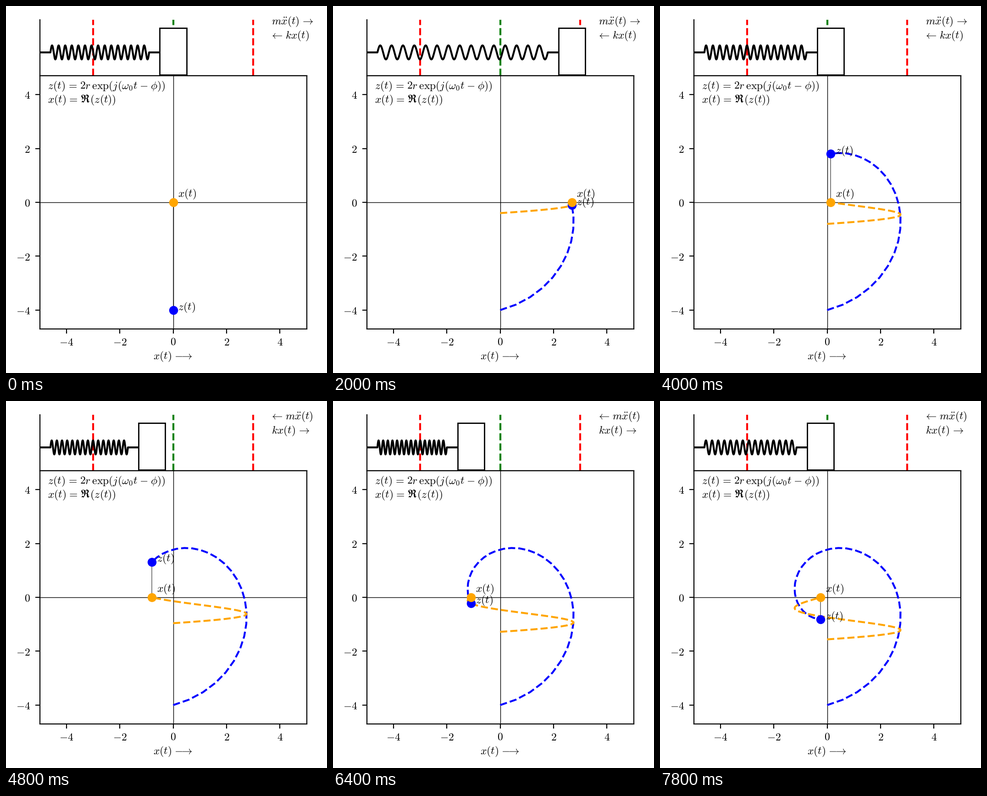
Animation of 700 by 800 pixels, one loop 8000 ms. Source, as a matplotlib script:

```python
import numpy as np
import matplotlib.pyplot as plt
from matplotlib.animation import FuncAnimation
from matplotlib.patches import Rectangle

plt.rcParams.update({
    "mathtext.fontset": "cm",
    "text.hinting": "no_hinting",
    "font.size": 8.48,
    "axes.linewidth": 0.8,
    "xtick.major.pad": 2.8,
    "ytick.major.pad": 3.9,
})

W, H, DPI = 700, 800, 200
FRAMES, INTERVAL = 40, 200
DT = 0.04          # time step per frame
DECAY = 0.994
OMEGA = 3.838
COILS = 15
LABEL_DX = 0.18

steps = np.arange(FRAMES) * DT
amp = 4 * np.exp(-DECAY * steps)
zx = amp * np.sin(OMEGA * steps)
zy = -amp * np.cos(OMEGA * steps)

fig = plt.figure(figsize=(W / DPI, H / DPI), dpi=DPI, facecolor="white")


def add_axes(top, height, left=73.55, width=582):
    return fig.add_axes([left / W, 1 - (top + height) / H, width / W, height / H])


# Spring and mass
top = add_axes(30, 122)
top.set(xlim=(-5, 5), ylim=(0, 1.2), xticks=[], yticks=[])
top.spines[["top", "right"]].set_visible(False)
for pos, color in ((-3, "red"), (0, "green"), (3, "red")):
    top.axvline(pos, color=color, ls="--", lw=1.5, zorder=1)
spring, = top.plot([], [], color="black", lw=1.5, zorder=2)
mass = Rectangle((-0.5, 0.02), 1, 1, fc="white", ec="black", lw=1, zorder=3)
top.add_patch(mass)
inertia = top.text(3.685, 1.1, "")
force = top.text(3.685, 0.8, "")

# Complex plane
plane = add_axes(152, 552)
ticks = range(-4, 5, 2)
labels = [f"${v}$" for v in ticks]
plane.set(xlim=(-5, 5), ylim=(-4.7, 4.7))
plane.set_xticks(ticks, labels)
plane.set_yticks(ticks, labels)
plane.axhline(0, color="black", lw=0.5, zorder=1)
plane.axvline(0, color="black", lw=0.5, zorder=1)
link, = plane.plot([], [], color="black", alpha=0.6, lw=0.6, zorder=1.5)
z_trace, = plane.plot([], [], "--", color="blue", lw=1.5)
x_trace, = plane.plot([], [], "--", color="orange", lw=1.5)
z_dot, = plane.plot([], [], "o", color="blue", ms=6)
x_dot, = plane.plot([], [], "o", color="orange", ms=6)
z_label = plane.text(0, 0, r"$z\hspace{.04}(t)$")
x_label = plane.text(0, 0.2, "$x(t)$")

EQ = r"\hspace{.12}=\hspace{.12}"
MINUS = r"\hspace{.05}-\hspace{.05}"
plane.text(-4.7, 4.2, r"$z\hspace{.04}(t)" + EQ +
           r"2r\hspace{.22}\exp(j\hspace{.06}(\omega_0\hspace{.03}t" +
           MINUS + r"\phi))$")
plane.text(-4.7, 3.7, r"$x(t)" + EQ + r"\mathfrak{R}(z\hspace{.04}(t))$")
fig.text(321.2 / W, 1 - 770.3 / H,
         r"$x(t)\hspace{.316}{-}\hspace{-.39}\rightarrow$")


def arrow_right(expr):
    return rf"${expr}\hspace{{.12}}\rightarrow$"


def arrow_left(expr):
    return rf"$\hspace{{-.2}}\leftarrow\hspace{{.12}}{expr}$"


MX, KX = r"m\ddot{x}(t)", r"kx(t)"
u = np.linspace(0, 1, 601)


def draw(n):
    x, y = zx[n], zy[n]

    end = x - 0.9
    coil_x = -4.6 + u * (end + 4.6)
    coil_y = 0.5 + 0.15 * np.sin(2 * np.pi * COILS * u)
    spring.set_data(np.r_[-5, coil_x, x - 0.5], np.r_[0.5, coil_y, 0.5])
    mass.set_x(x - 0.5)

    forward = x >= 0
    inertia.set_text(arrow_right(MX) if forward else arrow_left(MX))
    force.set_text(arrow_left(KX) if forward else arrow_right(KX))

    past = slice(0, n + 1)
    z_trace.set_data(zx[past], zy[past])
    x_trace.set_data(zx[past], steps[past] - steps[n])
    link.set_data([x, x], [0, y])
    z_dot.set_data([x], [y])
    x_dot.set_data([x], [0])
    z_label.set_position((x + LABEL_DX, y))
    x_label.set_position((x + LABEL_DX, 0.2))
    return spring, mass, inertia, force, z_trace, x_trace, link, z_dot, x_dot


anim = FuncAnimation(fig, draw, frames=FRAMES, interval=INTERVAL,
                     repeat=True, repeat_delay=0, blit=False)
plt.show()
```
